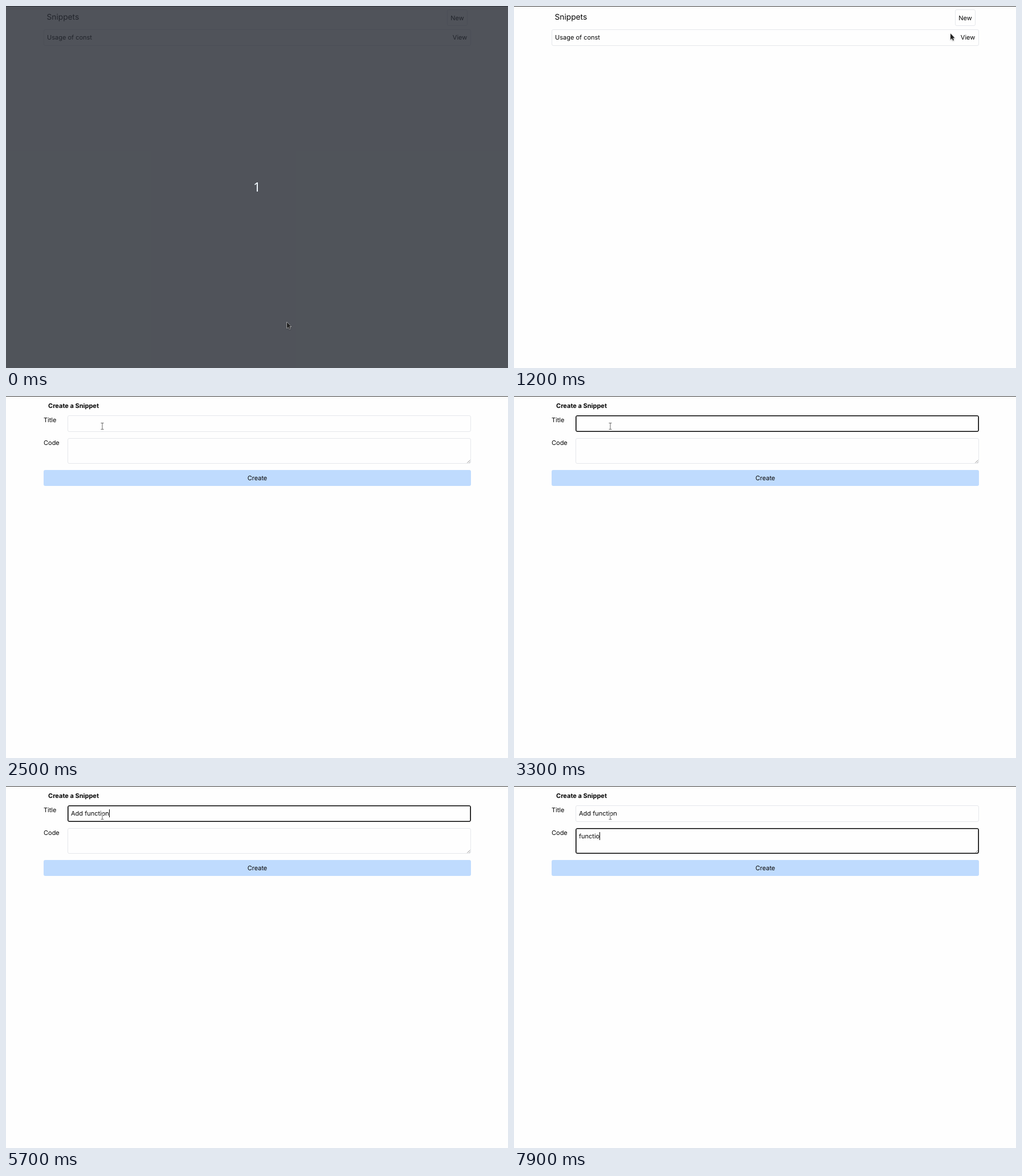
Animation of 881x636 px, one loop 8 s. Source, as an HTML page:

```html
<!DOCTYPE html>
<html lang="en">
<head>
<meta charset="utf-8">
<title>Snippets</title>
<style>
  html, body { margin: 0; width: 100%; height: 100%; overflow: hidden; background: #fefefe; }
  #stage {
    position: relative; width: 881px; height: 636px; overflow: hidden;
    font: 11px/16px Inter, sans-serif; color: #050505;
    text-rendering: geometricPrecision; white-space: pre;
  }
  #stage *, #stage { box-sizing: border-box; cursor: default; }
  .layer, .layer > *, .pointer { position: absolute; }
  .layer { inset: 0; }
  .box { border: 1px solid #e5e7eb; border-radius: 3px; }
  .center { text-align: center; }
  .topline { position: absolute; left: 0; top: 0; width: 100%; height: 1px; background: #3a3a3a; }

  .list { animation: list 8s step-end infinite; }
  .form { animation: form 8s step-end infinite; }
  .countdown { animation: countdown 8s step-end infinite; background: rgba(40, 44, 52, .81); }
  @keyframes list { 0% { visibility: visible } 22.5%, 100% { visibility: hidden } }
  @keyframes form { 0% { visibility: hidden } 22.5%, 100% { visibility: visible } }
  @keyframes countdown { 0% { visibility: visible } 1.25%, 100% { visibility: hidden } }

  .heading { left: 71.5px; top: 12px; font-size: 13.74px; }
  .new { left: 774px; top: 6px; width: 36px; height: 29px; padding-top: 6px; }
  .row { left: 66px; top: 41px; width: 750px; height: 29px; }

  .title { left: 108px; top: 34px; width: 708px; height: 29px; animation: focus-title 8s step-end infinite; }
  .code { left: 108px; top: 74px; width: 708px; height: 45px; animation: focus-code 8s step-end infinite; }
  @keyframes focus-title {
    0%, 75%, 100% { border-color: #e5e7eb; box-shadow: none }
    33.75% { border-color: #000; box-shadow: inset 0 0 0 .6px #000 }
  }
  @keyframes focus-code {
    0% { border-color: #e5e7eb; box-shadow: none }
    75%, 100% { border-color: #000; box-shadow: inset 0 0 0 .6px #000 }
  }
  .grip { left: 809px; top: 112px; }
  .create {
    left: 66px; top: 130px; width: 750px; height: 28px; padding-top: 6px;
    background: #bfdbfe; border-radius: 3px;
  }
  .field { left: 114px; }
  .field i {
    display: inline-block; width: 1px; height: 14px; margin-right: -1px;
    vertical-align: -3px; background: #000;
  }
  .count {
    left: 0; top: 302px; width: 881px; line-height: 31px;
    font-family: "Noto Sans", sans-serif; font-size: 22.5px; color: #f2f9ff;
  }
  .pointer { left: 0; top: 0; overflow: visible; }
  #arrow { filter: drop-shadow(0 1px 1px rgba(0, 0, 0, .3)); }
</style>
</head>
<body>
<div id="stage">
  <div class="layer list">
    <span class="heading">Snippets</span>
    <div class="box new center">New</div>
    <div class="box row"></div>
    <span style="left:72px;top:47px">Usage of const</span>
    <span style="right:71.7px;top:47px">View</span>
  </div>

  <div class="layer form">
    <b style="left:74px;top:9px">Create a Snippet</b>
    <span style="left:66px;top:34px">Title</span>
    <div class="box title"></div>
    <span class="field" style="top:40px"><span id="titleText"></span><i id="titleCaret"></i></span>
    <span style="left:66px;top:74px">Code</span>
    <div class="box code"></div>
    <svg class="grip" width="6" height="6"><path d="M.5 5.5l5-5M3.5 5.5l2-2" stroke="#777" stroke-width=".8"/></svg>
    <span class="field" style="top:80px"><span id="codeText"></span><i id="codeCaret"></i></span>
    <div class="create center">Create</div>
  </div>

  <div class="topline"></div>
  <div class="layer countdown"><div class="count center">1</div></div>

  <svg class="pointer" width="1" height="1">
    <path id="arrow" d="M0 0V10.8L2.5 8.5L4.3 12.4L6 11.6L4.3 7.8H7.5Z"
      fill="#222" stroke="#fff" stroke-width="1" paint-order="stroke"/>
    <g id="beam" fill="none">
      <path d="M-2.5-5.5H2.5M0-5.5V5.5M-2.5 5.5H2.5" stroke="#fff" stroke-width="2"/>
      <path d="M-2.5-5.5H2.5M0-5.5V5.5M-2.5 5.5H2.5" stroke="#666"/>
    </g>
  </svg>
</div>

<script>
  const LOOP = 8000, STEP = 100, BLINK = 600;
  const $ = id => document.getElementById(id);

  // Each entry: time in ms, characters shown from then on.
  const title = {
    text: "Add function", from: 2700, to: 6000,
    keys: [[2700, 0], [3900, 1], [4200, 2], [4400, 3], [4600, 4], [4900, 5], [5000, 6],
           [5200, 8], [5400, 9], [5500, 10], [5600, 11], [5700, 12]]
  };
  const code = {
    text: "function", from: 6000, to: LOOP,
    keys: [[6000, 0], [6700, 1], [6800, 2], [6900, 3], [7000, 4],
           [7200, 5], [7300, 7], [7400, 8], [7900, 7]]
  };

  // Pointer stops: time, x, y. Equal neighbours are pauses.
  const stops = [
    [0, 493, 555.5], [100, 490.5, 586], [200, 506, 604], [300, 528, 608],
    [400, 528, 608], [1300, 774.5, 28.5], [1600, 796.5, 17],
    [1800, 796.5, 17], [2500, 169, 53], [LOOP, 169, 53]
  ];

  const smooth = p => p * p * (3 - 2 * p);

  function pointerAt(t) {
    const k = stops.findIndex(s => s[0] > t);
    const [t0, x0, y0] = stops[k - 1], [t1, x1, y1] = stops[k];
    const p = smooth((t - t0) / (t1 - t0));
    return [x0 + (x1 - x0) * p, y0 + (y1 - y0) * p];
  }

  function type(name, field, t) {
    const last = field.keys.filter(k => k[0] <= t).pop();
    const focused = t >= field.from && t < field.to;
    const lit = focused && Math.floor((t - last[0]) / BLINK) % 2 === 0;
    $(name + "Text").textContent = field.text.slice(0, last ? last[1] : 0);
    $(name + "Caret").style.opacity = lit ? 1 : 0;
  }

  function draw(now) {
    const t = Math.floor((now % LOOP) / STEP) * STEP;
    type("title", title, t);
    type("code", code, t);

    const [x, y] = pointerAt(t);
    const overField = t > 1800 && x > 108 && x < 816 && y > 34 && y < 63;
    $("arrow").style.display = overField ? "none" : "";
    $("beam").style.display = overField ? "" : "none";
    document.querySelector(".pointer").style.transform = `translate(${x}px, ${y}px)`;
    requestAnimationFrame(draw);
  }
  draw(performance.now());
</script>
</body>
</html>
```
